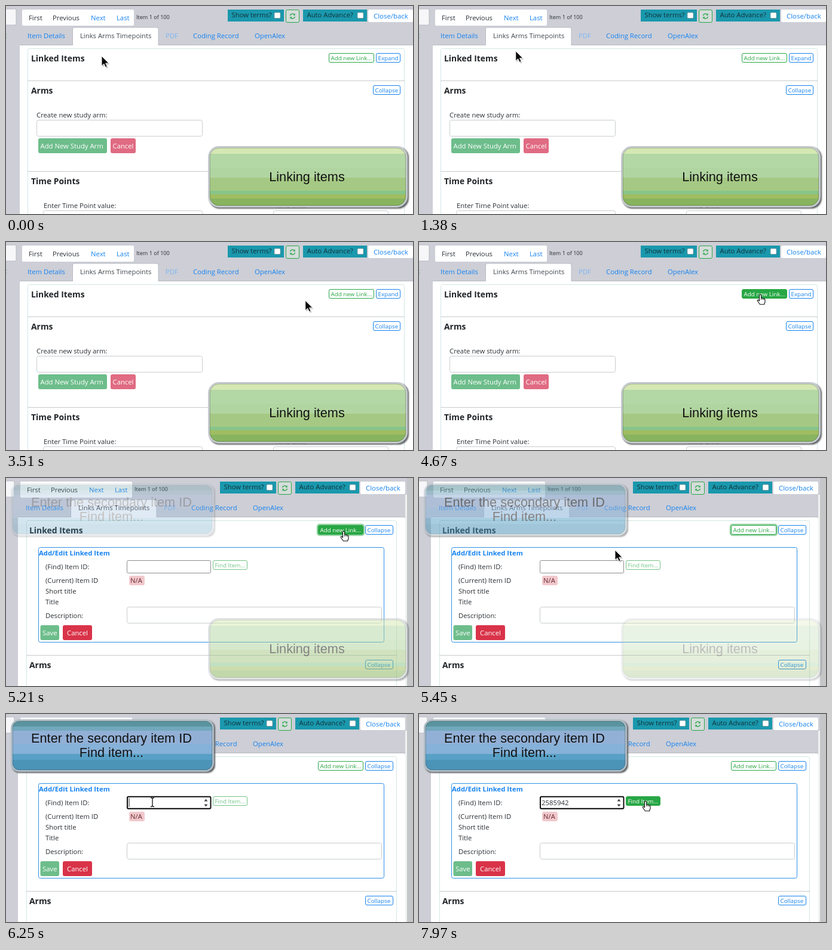
Write an HTML page that moves like this. It is 681 by 349 pixels and loops after 8000 ms.

```html
<!DOCTYPE html>
<html lang="en">
<head>
<meta charset="utf-8">
<title>Linking items</title>
<style>
html, body { margin: 0; width: 100%; height: 100%; overflow: hidden; background: #fff; }
svg { display: block; }
text { font-family: "Open Sans", "Noto Sans", sans-serif; white-space: pre; }
.banner text { font-family: "Liberation Sans", Arial, sans-serif; font-size: 21.7px; text-anchor: middle; }
</style>
</head>
<body>
<svg id="stage" width="681" height="349" viewBox="0 0 681 349"></svg>
<script>
const LOOP = 8000;
const SWAP = 4970, FOCUS = 6130, PASTE = 7160, READY = 7940;
const BLUE = '#1683f0', GREEN = '#28a745', INK = '#2b3035', GRAY = '#cdced6';
const SOFT_GREEN = '#6dbd8b', SOFT_RED = '#e06b82', RED = '#d93349', TEAL = '#1a98ad';

const attrs = o => Object.entries(o).map(([k, v]) => ` ${k}="${v}"`).join('');
const box = (x, y, x2, y2, fill, stroke = 'none', rx = 0, more = {}) =>
  `<rect${attrs({ x, y, width: x2 - x, height: y2 - y, fill, stroke, rx, ...more })}/>`;
const frame = (x, y, x2, y2, stroke, rx = 2.5, fill = '#fff') =>
  box(x + .5, y + .5, x2 - .5, y2 - .5, fill, stroke, rx);
const text = (x, y, s, fill = INK, size = 11.3, weight = 400) =>
  `<text${attrs({ x, y, fill, 'font-size': size, 'font-weight': weight })}>${s}</text>`;
const title = (x, y, s) => text(x, y, s, '#212529', 13.9, 700);
const line = (x, x2, y, color = '#c8cacd') => box(x, y, x2, y + 1, color);
const button = (x, y, x2, y2, s, fill, pad = 3.5) =>
  box(x, y, x2, y2, fill, 'none', 3) + text(x + pad, y + 16.5, s, '#fff');
const outline = (x, y, x2, s, color) => frame(x, y, x2, y + 16, color) + text(x + 3.5, y + 12, s, color, 9.8);
const hoverButton = (id, x, y, x2, s) =>
  `<g id="${id}">${box(x + .5, y + .5, x2 - .5, y + 15.5, '#fff', GREEN, 2.5)}${text(x + 3.5, y + 12, s, GREEN, 9.8)}</g>`;

// l shifts the left-aligned parts, r the right-aligned ones
function chrome(l, r) {
  const check = (x, x2, s, mark) =>
    box(x + r, 6, x2 + r, 26, TEAL) + text(x + r + 6.5, 19, s, '#12323a') +
    box(mark + r, 11, mark + 10 + r, 20.5, '#fff', '#7b8a90', 1.5, { 'stroke-width': .7 });
  const tab = (x, s, color = BLUE) => text(x + l, 54, s, color);
  return box(0, 0, 681, 349, GRAY) +
    box(-4, 5, 17 + l, 32, '#f7f7f9', '#b9bbc2', 2) + text(-2.5 + l / 3, 53, 't', GREEN) +
    box(27 + l, 6, 214 + l, 33, '#fff', 'none', 2) +
    text(38 + l, 24, 'First') + text(78 + l, 24, 'Previous') +
    text(142 + l, 24, 'Next', BLUE) + text(185 + l, 24, 'Last', BLUE) +
    text(218 + l, 22, 'Item 1 of 100', INK, 9.1) +
    check(371, 465, 'Show terms?', 449) + check(497, 604, 'Auto Advance?', 588) +
    frame(468 + r, 6, 491 + r, 28, GREEN, 2.5, '#d5dcdb') +
    `<g transform="translate(${479.5 + r} 17)" fill="none" stroke="${GREEN}" stroke-width="1.4">
      <path d="M-4-.8A4.1 4.1 0 0 1 3-2.8M4 .8A4.1 4.1 0 0 1-3 2.8"/>
      <path d="M4.2-4.6V-1.2H.8ZM-4.2 4.6V1.2H-.8Z" fill="${GREEN}" stroke="none"/></g>` +
    box(606 + r, 6, 681 + r, 27, '#fff', 'none', 2) + text(615 + r, 20.5, 'Close/back', BLUE, 11.4) +
    box(23 + l, 65, 681 + r, 349, '#fff') + line(23 + l, 681 + r, 65, '#b9bcc2') +
    `<path d="M${111.5 + l} 66V39q0-3 3-3H${252 + l}q3 0 3 3V66" fill="#fff" stroke="#b9bcc2"/>` +
    tab(36, 'Item Details') + tab(124, 'Links Arms Timepoints', '#41474d') +
    tab(267, 'PDF', '#7db6f2') + tab(313, 'Coding Record') + tab(416, 'OpenAlex');
}

// stacked panels that run off the bottom, split by gray rules
const cards = (x, x2, top, rules) =>
  frame(x, top, x2, 360, '#d3e7e6', 3) + rules.map(y => line(x, x2, y)).join('');

const before = chrome(0, 0) + cards(36, 667, 71, [125, 277]) +
  title(42, 93, 'Linked Items') +
  hoverButton('addA', 540, 79, 616, 'Add new Link...') + outline(619, 79, 660, 'Expand', BLUE) +
  title(42, 147, 'Arms') + outline(614, 133, 660, 'Collapse', BLUE) +
  text(51, 187, 'Create new study arm:') + frame(51, 191, 329, 219, '#c9ccd0', 3) +
  button(54, 222, 169, 247, 'Add New Study Arm', SOFT_GREEN) + button(175, 222, 217, 247, 'Cancel', SOFT_RED) +
  title(42, 299, 'Time Points') +
  text(63, 339, 'Enter Time Point value:') + frame(62, 343, 329, 370, '#c9ccd0', 3) +
  text(449, 339, 'Time Unit:') + frame(447, 343, 640, 370, '#c9ccd0', 3);

const after = chrome(-3, -13) +
  box(668, 28, 671, 349, '#eef3f1') + box(671, 0, 681, 349, '#c5c6c8') + line(667, 668, 66) +
  cards(34, 654, 71, [297]) + title(39, 93, 'Linked Items') +
  box(521, 78, 599, 96, 'none', '#94d3a2', 3.5, { id: 'ring', 'stroke-width': 2.4 }) +
  hoverButton('addB', 522, 79, 598, 'Add new Link...') + outline(601, 79, 648, 'Collapse', BLUE) +
  frame(54, 116, 633, 276, '#2f8fe6', 3) + text(55, 130, 'Add/Edit Linked Item', BLUE, 11.3, 700) +
  text(66, 153, '(Find) Item ID:') + text(66, 176, '(Current) Item ID') +
  text(66, 194, 'Short title') + text(66, 212, 'Title') + text(66, 235, 'Description:') +
  frame(202, 138, 343, 160, '#8b8d90', 2) +
  `<g id="focused">${box(203, 138.8, 342.5, 158.8, '#fff', '#101010', 2, { 'stroke-width': 2 })}
    <path d="M331.5 146.5l3-4 3 4ZM331.5 151.5l3 4 3-4Z" fill="#444"/></g>` +
  `<g id="digits">${text(205, 153, '2585942', INK, 11.4)}</g>` +
  box(205.5, 141, 206.5, 156, '#222', 'none', 0, { id: 'caret' }) +
  hoverButton('find', 346, 138, 404, 'Find Item...') +
  box(206, 164, 232, 180, '#f1c9cd', 'none', 3) + text(208, 176, 'N/A', '#6b2a33') +
  frame(202, 216, 629, 244, '#c9ccd0', 3) +
  button(57.5, 247, 89, 272, 'Save', SOFT_GREEN) + button(95, 247, 144, 272, 'Cancel', RED, 7) +
  title(39, 319, 'Arms') + outline(601, 305, 648, 'Collapse', BLUE);

// bands: [lower edge, colour] from top to bottom
function banner(id, x, y, x2, y2, rx, rim, bands, lines) {
  let from = y;
  const stops = bands.map(([to, c]) => {
    const at = v => (v - y) / (y2 - y);
    const s = `<stop offset="${at(from)}" stop-color="${c}"/><stop offset="${at(to)}" stop-color="${c}"/>`;
    from = to;
    return s;
  }).join('');
  const mid = (x + x2) / 2;
  return `<g id="${id}" class="banner">
    <linearGradient id="${id}Fill" x2="0" y2="1">${stops}</linearGradient>
    ${box(x + 2, y + 2, x2 + 2, y2 + 2, '#4a4d50', 'none', rx, { filter: 'url(#soft)', opacity: .85 })}
    ${box(x + 1.5, y + 1.5, x2 - 1.5, y2 - 1.5, `url(#${id}Fill)`, rim, rx, { 'stroke-width': 3 })}
    ${box(x + 3.3, y + 3.3, x2 - 3.3, y2 - 3.3, 'none', '#000', rx - 2, { opacity: .22 })}
    ${lines.map(([ly, s]) => `<text x="${mid - 1.5}" y="${ly}" fill="#111">${s}</text>`).join('')}</g>`;
}

const stage = document.getElementById('stage');
stage.innerHTML = `<defs><filter id="soft"><feGaussianBlur stdDeviation="1"/></filter></defs>
  <g id="before">${before}</g><g id="after">${after}</g>` +
  banner('linking', 338, 235, 672, 338, 17, '#c6cbcf', [
    [247, '#d5e8b3'], [272, '#b4d7a6'], [288, '#b1d5a0'], [311, '#a5c984'],
    [317, '#88c489'], [324, '#a0bd60'], [338, '#88b45f']
  ], [[294, 'Linking items']]) +
  banner('enter', 8, 9, 348, 97, 13, '#aebdc6', [
    [20, '#5a949f'], [27, '#72a8bd'], [50, '#92b0d6'], [68, '#86b1d8'], [78, '#58a0c6'], [97, '#4c93b8']
  ], [[48, 'Enter the secondary item ID'], [72, 'Find item...']]) +
  `<g id="pointer" stroke-linejoin="round">
    <g id="arrow"><path d="M1.5 2V18.5L5.4 15L8 20.7L10.7 19.5L8.2 14H13.5Z" opacity=".25"/>
      <path d="M0 0V16.5L3.9 13L6.5 18.7L9.2 17.5L6.7 12H12Z" fill="#0a0a0a" stroke="#fff" stroke-width=".9"/></g>
    <g id="hand"><path d="M-1.5 1.2Q0-.8 1.5 1.2V5.8L6.5 7Q8 7.5 8 9V12.5L6.5 16.8H-.5L-4.6 11Q-5.3 9-3.4 9L-1.5 10.8Z" fill="#fff" stroke="#111" stroke-width="1.1"/>
      <path d="M1.5 6V9M3.8 6.7V9.2M6 7.2V9.5" stroke="#111" stroke-width=".8"/></g>
    <path id="beam" d="M-3-7.5Q0-7.5 0-5.5Q0-7.5 3-7.5M0-6V6M-3 7.5Q0 7.5 0 5.5Q0 7.5 3 7.5" fill="none" stroke="#222" stroke-width="1.4"/>
  </g>`;

const el = id => document.getElementById(id);
const show = (id, on) => { el(id).style.display = on ? '' : 'none'; };
const clamp = v => Math.max(0, Math.min(1, v));
const ramp = (t, a, b) => clamp((t - a) / (b - a));

// pointer stops: time, x, y
const path = [
  [1200, 160, 84], [1750, 167, 51], [2550, 167, 51], [2610, 170, 60], [3390, 495, 99],
  [3450, 495, 99], [3810, 571, 88], [4670, 571, 88], [SWAP, 565, 89], [5210, 565, 89],
  [5450, 328, 121], [5930, 245, 148], [6450, 245, 148], [6660, 246, 147], [6900, 245, 148],
  [7160, 245, 148], [7910, 379, 146]
];

function pointerAt(t) {
  const i = path.findIndex(p => p[0] > t);
  if (i === 0) return path[0].slice(1);
  if (i < 0) return path[path.length - 1].slice(1);
  const [a, b] = [path[i - 1], path[i]];
  const u = ramp(t, a[0], b[0]), k = u * u * (3 - 2 * u);
  return [a[1] + (b[1] - a[1]) * k, a[2] + (b[2] - a[2]) * k];
}

function paint(id, filled) {
  const [plate, label] = el(id).children;
  plate.setAttribute('fill', filled ? GREEN : '#fff');
  label.setAttribute('fill', filled ? '#fff' : GREEN);
}

function draw(t) {
  const [x, y] = pointerAt(t);
  const over = (x1, y1, x2, y2) => x >= x1 && x <= x2 && y >= y1 && y <= y2;
  const swapped = t >= SWAP, pasted = t >= PASTE, ready = t >= READY;
  const overAdd = swapped ? over(522, 79, 598, 95) : over(540, 79, 616, 95);
  const overTab = !swapped && over(111, 36, 255, 66);
  const overInput = swapped && over(203, 138, 343, 160);

  show('before', !swapped);
  show('after', swapped);
  show('ring', t < FOCUS);
  show('focused', t >= FOCUS);
  show('digits', pasted);
  show('caret', t >= FOCUS && (t - FOCUS) % 1060 < 530);
  el('caret').setAttribute('x', pasted ? 251 : 205.5);
  paint('addA', overAdd);
  paint('addB', overAdd);
  paint('find', ready);
  el('find').setAttribute('opacity', pasted ? 1 : .65);

  el('linking').setAttribute('opacity', 1 - ramp(t, 4730, 5730));
  el('enter').setAttribute('opacity', ramp(t, 4980, 5880));

  const hand = overAdd || overTab || ready;
  show('hand', hand);
  show('beam', overInput);
  show('arrow', !hand && !overInput);
  el('pointer').setAttribute('transform', `translate(${x.toFixed(1)} ${y.toFixed(1)})`);
}

const start = performance.now();
function tick() {
  draw((performance.now() - start) % LOOP);
  requestAnimationFrame(tick);
}
tick();
</script>
</body>
</html>
```
